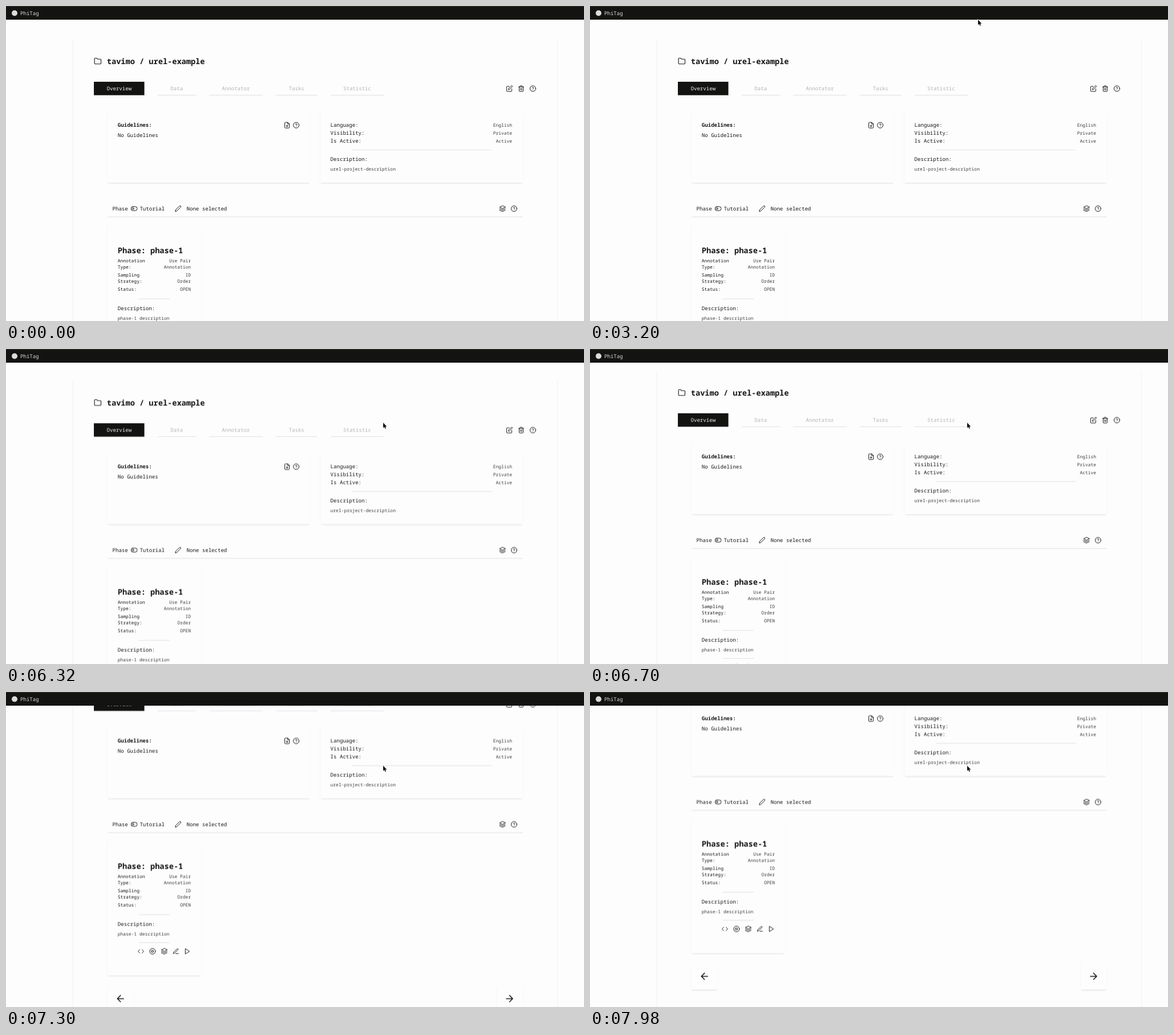
These frames come from a looping animation (1013 by 553 pixels, 8 s). An HTML page:

```html
<!DOCTYPE html>
<html lang="en">
<head>
<meta charset="utf-8">
<title>Project overview</title>
<style>
  html, body { margin: 0; width: 100%; height: 100%; overflow: hidden; background: #fdfdfd; }
  .stage { position: relative; width: 1013px; height: 553px; overflow: hidden; background: #fdfdfd; }
  .page { position: absolute; left: 0; top: 0; width: 1013px; height: 760px; animation: scroll 8s linear infinite; }
  svg { position: absolute; left: 0; top: 0; overflow: visible; }

  .frame { position: absolute; left: 117px; top: 58px; width: 848px; height: 720px; border: solid #f1f1f6; border-width: 0 1px; }
  .card { position: absolute; background: #fdfdfd;
    box-shadow: 0 2.3px 3.4px -.6px rgba(20, 20, 50, .11), 0 1.1px 2.3px -1.1px rgba(20, 20, 50, .12); }
  .bar { position: absolute; left: 0; top: 0; width: 1013px; height: 23.6px; background: #131312; box-shadow: inset 0 1px #30332a; }

  text { font: 500 9.08px "Noto Sans Mono", "DejaVu Sans Mono", monospace; fill: #161616; text-rendering: geometricPrecision; }
  .strong { font-weight: 600; }
  .title { font-size: 13.63px; font-weight: 700; }
  .small { font-size: 7.95px; }
  .light { font-size: 7.95px; font-weight: 400; fill: #3c3c3c; }
  .right { text-anchor: end; }
  .mid { text-anchor: middle; }
  .tab { fill: #b4b4b4; font-weight: 400; }
  .on { fill: #f2f2f2; font-weight: 400; }
  .rule { stroke: #e0e0e7; stroke-width: 1; fill: none; }
  symbol, .icons { fill: none; stroke: #161616; stroke-width: 2; stroke-linecap: round; stroke-linejoin: round; }

  .cursor { animation: point 8s linear infinite, show 8s step-end infinite; }

  @keyframes scroll {
    0%, 75.5% { transform: translateY(0); }
    79.5% { transform: translateY(-3px); }
    82% { transform: translateY(-9px); }
    83.75% { transform: translateY(-20px); }
    85.75% { transform: translateY(-48px); }
    87.75% { transform: translateY(-76.8px); }
    91.25% { transform: translateY(-123.3px); }
    93% { transform: translateY(-142px); }
    94.75% { transform: translateY(-154px); }
    97.25% { transform: translateY(-161px); }
    99.75%, 100% { transform: translateY(-162.6px); }
  }
  @keyframes point {
    0%, 7.25% { transform: translate(287px, 182px); }
    10% { transform: translate(420px, 150px); }
    13% { transform: translate(640px, 98px); }
    14.75% { transform: translate(721px, 88px); }
    16%, 17.5% { transform: translate(698px, 82px); }
    19.5%, 28% { transform: translate(690px, 61px); }
    31% { transform: translate(692px, 56px); }
    36.75%, 38.75% { transform: translate(679px, 22px); }
    40%, 59.75% { transform: translate(680px, 24px); }
    62.5% { transform: translate(684px, 50px); }
    68.5%, 100% { transform: translate(661px, 129.3px); }
  }
  @keyframes show {
    0% { opacity: 0; }
    7.25%, 100% { opacity: 1; }
  }
</style>
</head>
<body>
<div class="stage">
  <div class="page">
    <div class="frame"></div>
    <div class="card" style="left:178px;top:184px;width:354.5px;height:126px"></div>
    <div class="card" style="left:550.5px;top:184px;width:355px;height:126px"></div>
    <div class="card" style="left:178px;top:384px;width:164px;height:236.5px"></div>
    <div class="card" style="left:178px;top:639px;width:45.5px;height:45.5px"></div>
    <div class="card" style="left:860px;top:639px;width:45.5px;height:45.5px"></div>

    <svg width="1013" height="760" viewBox="0 0 1013 760">
      <defs>
        <symbol id="folder" viewBox="0 0 24 24"><path d="M22 19a2 2 0 0 1-2 2H4a2 2 0 0 1-2-2V5a2 2 0 0 1 2-2h5l2 3h9a2 2 0 0 1 2 2z"/></symbol>
        <symbol id="edit" viewBox="0 0 24 24"><path d="M11 4H4a2 2 0 0 0-2 2v14a2 2 0 0 0 2 2h14a2 2 0 0 0 2-2v-7M18.5 2.5a2.12 2.12 0 0 1 3 3L12 15l-4 1 1-4z"/></symbol>
        <symbol id="trash" viewBox="0 0 24 24"><path d="M3 6h18M19 6v14a2 2 0 0 1-2 2H7a2 2 0 0 1-2-2V6M8 6V4a2 2 0 0 1 2-2h4a2 2 0 0 1 2 2v2M10 11v6M14 11v6"/></symbol>
        <symbol id="help" viewBox="0 0 24 24"><circle cx="12" cy="12" r="10"/><path d="M9.1 9a3 3 0 0 1 5.8 1c0 2-3 3-3 3M12 17h.01"/></symbol>
        <symbol id="file" viewBox="0 0 24 24"><path d="M14 2H6a2 2 0 0 0-2 2v16a2 2 0 0 0 2 2h12a2 2 0 0 0 2-2V8zv6h6M12 18v-6M9 15h6"/></symbol>
        <symbol id="toggle" viewBox="0 0 24 24"><rect x="1" y="5" width="22" height="14" rx="7"/><circle cx="8" cy="12" r="3"/></symbol>
        <symbol id="pencil" viewBox="0 0 24 24"><path d="M17 3a2.83 2.83 0 1 1 4 4L7.5 20.500 2 22l1.500-5.500z"/></symbol>
        <symbol id="layers" viewBox="0 0 24 24"><path d="M12 2 2 7l10 5 10-5zM2 17l10 5 10-5M2 12l10 5 10-5"/></symbol>
        <symbol id="code" viewBox="0 0 24 24"><path d="M16 18l6-6-6-6M8 6l-6 6 6 6"/></symbol>
        <symbol id="stop" viewBox="0 0 24 24"><circle cx="12" cy="12" r="10"/><path d="M9 9h6v6H9z"/></symbol>
        <symbol id="write" viewBox="0 0 24 24"><path d="M12 20h9M16.500 3.500a2.12 2.12 0 0 1 3 3L7 19l-4 1 1-4z"/></symbol>
        <symbol id="play" viewBox="0 0 24 24"><path d="M5 3l14 9-14 9z"/></symbol>
        <symbol id="back" viewBox="0 0 24 24"><path d="M19 12H5M12 19l-7-7 7-7"/></symbol>
        <symbol id="next" viewBox="0 0 24 24"><path d="M5 12h14M12 5l7 7-7 7"/></symbol>
      </defs>

      <text class="title" x="176.800" y="101.500">tavimo / urel-example</text>

      <rect x="154" y="133" width="88.500" height="23.600" fill="#131312"/>
      <text class="mid on" x="198.300" y="147.500">Overview</text>
      <text class="mid tab" x="299.200" y="147.500">Data</text>
      <text class="mid tab" x="402.800" y="147.500">Annotator</text>
      <text class="mid tab" x="509.200" y="147.500">Tasks</text>
      <text class="mid tab" x="615.500" y="147.500">Statistic</text>
      <path class="rule" d="M266 156.500h67M356 156.500h94M473 156.500h73M569 156.500h93.500"/>

      <text class="strong" x="195.800" y="212.200">Guidelines:</text>
      <text x="195.800" y="230.400">No Guidelines</text>

      <text x="568.600" y="212.300">Language:</text>
      <text x="568.600" y="226">Visibility:</text>
      <text x="568.600" y="239.700">Is Active:</text>
      <text class="light right" x="887" y="212.300">English</text>
      <text class="light right" x="887" y="226">Private</text>
      <text class="light right" x="887" y="239.700">Active</text>
      <path class="rule" d="M606 252.800h245"/>
      <text x="568.600" y="272.300">Description:</text>
      <text class="light" x="568.600" y="289.300">urel-project-description</text>

      <text x="186.500" y="359">Phase</text>
      <text x="234.400" y="359">Tutorial</text>
      <text x="316.500" y="359">None selected</text>
      <path class="rule" d="M178 370.200h727.500"/>

      <text class="title" x="195.800" y="434.300">Phase: phase-1</text>
      <text class="small" x="195.800" y="449.800">Annotation</text>
      <text class="small" x="195.800" y="461.200">Type:</text>
      <text class="small" x="195.800" y="474.700">Sampling</text>
      <text class="small" x="195.800" y="486.200">Strategy:</text>
      <text class="small" x="195.800" y="499.700">Status:</text>
      <text class="light right" x="324" y="449.800">Use Pair</text>
      <text class="light right" x="324" y="461.200">Annotation</text>
      <text class="light right" x="324" y="474.700">ID</text>
      <text class="light right" x="324" y="486.200">Order</text>
      <text class="light right" x="324" y="499.700">OPEN</text>
      <path class="rule" d="M232.500 514.200h54.500M232.500 563.300h54.500"/>
      <text x="195.800" y="534">Description:</text>
      <text class="light" x="195.800" y="550.800">phase-1 description</text>

      <g class="icons">
        <use href="#folder" x="154" y="89.800" width="13.630" height="13.630"/>
        <use href="#edit" x="876.400" y="139" width="12" height="12"/>
        <use href="#trash" x="896.900" y="139" width="12" height="12"/>
        <use href="#help" x="917.400" y="139" width="12" height="12"/>
        <use href="#file" x="486.600" y="203.200" width="12" height="12"/>
        <use href="#help" x="502.600" y="203.200" width="12" height="12"/>
        <use href="#toggle" x="218.500" y="349.700" width="12" height="12"/>
        <use href="#pencil" x="295.600" y="349.700" width="12" height="12"/>
        <use href="#layers" x="864" y="349.800" width="12" height="12"/>
        <use href="#help" x="884.400" y="349.800" width="12" height="12"/>
        <use href="#code" x="230.400" y="572.600" width="12" height="12"/>
        <use href="#stop" x="250.800" y="572.600" width="12" height="12"/>
        <use href="#layers" x="271.300" y="572.600" width="12" height="12"/>
        <use href="#write" x="291.700" y="572.600" width="12" height="12"/>
        <use href="#play" x="312.100" y="572.600" width="12" height="12"/>
        <use href="#back" x="191.200" y="652.200" width="19" height="19"/>
        <use href="#next" x="873" y="652.200" width="19" height="19"/>
      </g>
    </svg>
  </div>

  <div class="bar"></div>
  <svg width="1013" height="553" viewBox="0 0 1013 553">
    <circle cx="15" cy="12.500" r="5" fill="#dcdcdc"/>
    <text class="on" x="25" y="15.700" style="fill:#dcdcdc">PhiTag</text>
    <path class="cursor" d="M0 0V9.300L2.100 7.400 3.600 10.800 5.100 10.100 3.700 6.900H6.500Z" fill="#111" stroke="#fff" stroke-width="1.200" paint-order="stroke"/>
  </svg>
</div>
</body>
</html>
```
